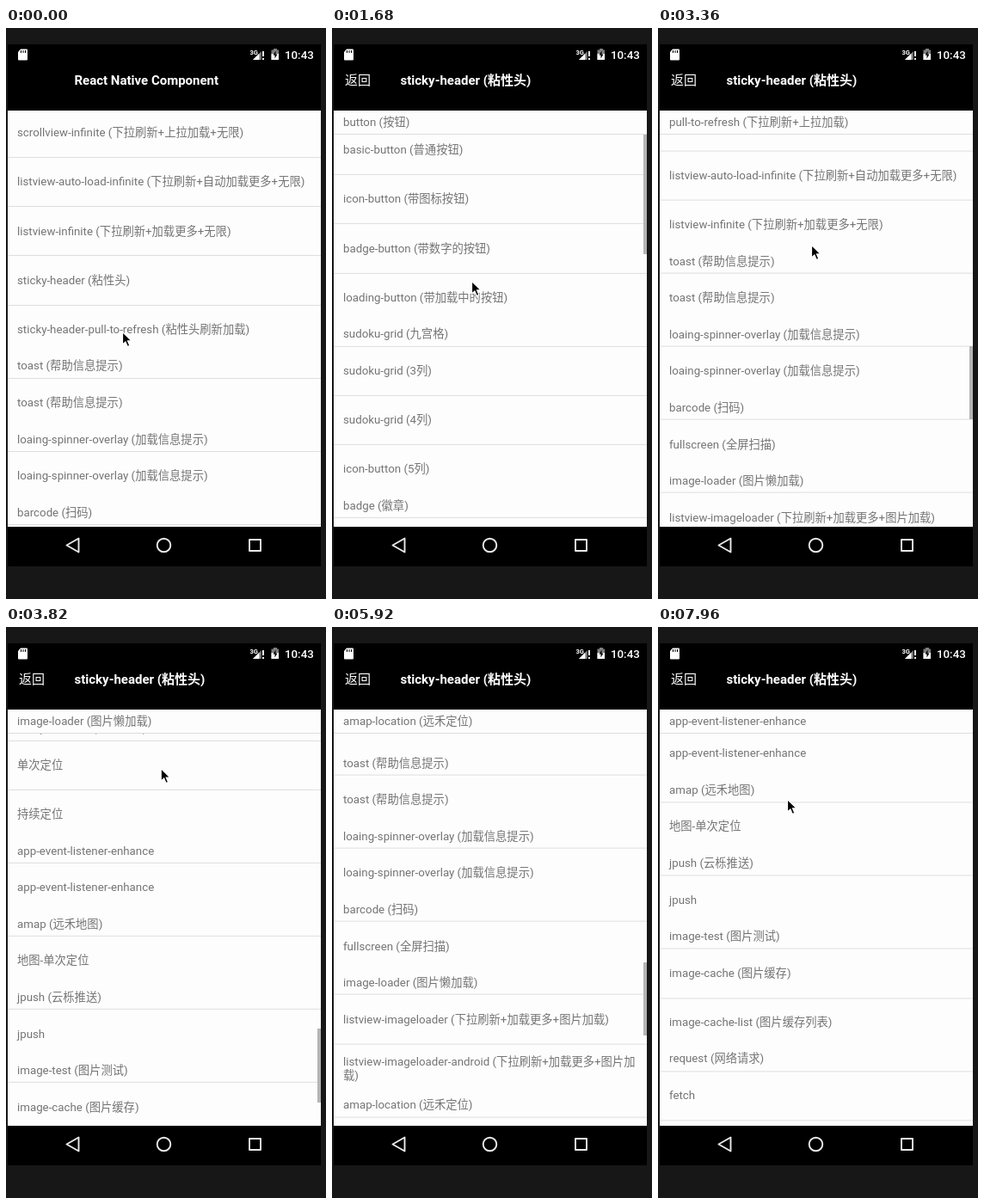
These frames come from a looping animation (372 px wide and 664 px high, 8 s). An HTML page:

```html
<!DOCTYPE html>
<html lang="zh-CN">
<head>
<meta charset="utf-8">
<title>Sticky header list</title>
<style>
html, body { margin: 0; width: 100%; height: 100%; overflow: hidden; background: #171717; }
body { position: relative; font: 13.3px/15.6px Roboto, "Noto Sans CJK SC", "Noto Sans CJK", sans-serif; color: #747474; }
.phone { position: absolute; left: 2px; top: 19px; width: 364px; height: 607px; background: #000; }
.view { position: absolute; left: 2px; top: 96px; width: 364px; height: 484px; overflow: hidden; background: #fdfdfd; }
.page { position: absolute; inset: 0; overflow: hidden; background: #fdfdfd; }
.list { position: absolute; inset: 0 0 auto 0; }
.row, .head { box-sizing: border-box; display: flex; align-items: center; padding: 0 11px; border-bottom: 1px solid #dedede; }
.row { height: 57.21px; }
.head { height: 27.91px; background: #fdfdfd; }
.row:has(+ .head) { border-color: transparent; }
#sticky { position: absolute; top: 0; left: 0; width: 100%; }
#thumb { position: absolute; right: 0; width: 4px; background: #b4b4b4; }
.bar { position: absolute; top: 51px; line-height: 20px; font-size: 15px; color: #fff; white-space: nowrap; }
.title { left: 79.5px; font-weight: 700; }
svg { position: absolute; left: 0; top: 0; }
</style>
</head>
<body>
<div class="phone"></div>
<div class="bar title" id="homeTitle">React Native Component</div>
<div class="bar title" id="demoTitle">sticky-header (粘性头)</div>
<div class="bar" id="back" style="left:15px">返回</div>
<div class="view">
  <div class="page" id="home"><div class="list" style="top:-2.2px"></div></div>
  <div class="page" id="demo">
    <div class="list"></div>
    <div id="thumb"></div>
    <div class="head" id="sticky"></div>
  </div>
</div>
<svg width="372" height="664" viewBox="0 0 372 664">
  <g fill="#fff">
    <path d="M17 24.5h7q1 0 1 1v11q0 1-1 1h-9q-1 0-1-1v-8.500z"/>
    <path d="M17.500 26v3M20 26v3M22.500 26v3" stroke="#000"/>
    <text x="283.500" y="30.500" font-size="7.500" font-weight="700">3G</text>
    <path d="M287 37L297 27V37z" opacity=".45"/>
    <path d="M287 37L294.500 29.500V37z"/>
    <path d="M298 27h2v6h-2zM298 35h2v2h-2z"/>
    <path d="M311 24h4v1.500h2V37h-8.500V25.500H311z" opacity=".5"/>
    <path d="M308.500 30h8.500v7h-8.500z"/>
    <path d="M313.500 26.500l-3 5h2v4l3-5h-2z" fill="#000"/>
    <text x="324" y="35.700" font-size="13.300" font-weight="500">10:43</text>
  </g>
  <g fill="none" stroke="#e9e9e9" stroke-width="1.900" stroke-linejoin="round" transform="translate(.5 .5)">
    <path d="M70 601L84 593V609z"/>
    <circle cx="183" cy="601" r="7.800"/>
    <path d="M282.500 594.500h13v13h-13z"/>
  </g>
  <path id="cursor" d="M0 0V14.500L3.400 11.400L5.800 17L8.400 15.900L6 10.400H10.500z" fill="#000" stroke="#fff" stroke-width="1.200"/>
</svg>
<script>
const ROW = 57.2, HEAD = 27.9, VIEW = 484, TOTAL = 2737.6, LOOP = 8000, STEP = 20;

// A leading "#" marks a section header.
const homeItems = `scrollview-infinite (下拉刷新+上拉加载+无限)
listview-auto-load-infinite (下拉刷新+自动加载更多+无限)
listview-infinite (下拉刷新+加载更多+无限)
sticky-header (粘性头)
sticky-header-pull-to-refresh (粘性头刷新加载)
#toast (帮助信息提示)
toast (帮助信息提示)
#loaing-spinner-overlay (加载信息提示)
loaing-spinner-overlay (加载信息提示)
#barcode (扫码)`.split("\n");

const demoItems = `#button (按钮)
basic-button (普通按钮)
icon-button (带图标按钮)
badge-button (带数字的按钮)
loading-button (带加载中的按钮)
#sudoku-grid (九宫格)
sudoku-grid (3列)
sudoku-grid (4列)
icon-button (5列)
#badge (徽章)
badge (徽章)
badge-text (文字徽章)
#checkbox (复选框)
checkbox (复选框)
checkbox-group (复选框组)
#gesture-password (手势密码)
gesture-password (手势密码)
gesture-password-verify (手势密码验证)
#swiper (轮播)
swiper (轮播)
swiper-auto (自动轮播)
#security-text (保密文本)
security-text (保密文本)
#refresh-infinite-control (上拉刷新,下拉加载)
refresh-infinite-scrollview (上拉刷新,下拉加载)
#timer-enhance (es6 timer mixin)
timer-enhance(es6 timer mixin)
#pull-to-refresh (下拉刷新+上拉加载)
scrollview (下拉刷新+上拉加载更多)
listview (下拉刷新+上拉加载更多)
scrollview-auto-load (下拉刷新+自动加载更多)
listview-auto-load (下拉刷新+自动加载更多)
scrollview-infinite (下拉刷新+上拉加载+无限)
listview-auto-load-infinite (下拉刷新+自动加载更多+无限)
listview-infinite (下拉刷新+加载更多+无限)
#toast (帮助信息提示)
toast (帮助信息提示)
#loaing-spinner-overlay (加载信息提示)
loaing-spinner-overlay (加载信息提示)
#barcode (扫码)
fullscreen (全屏扫描)
#image-loader (图片懒加载)
listview-imageloader (下拉刷新+加载更多+图片加载)
listview-imageloader-android (下拉刷新+加载更多+图片加载)
#amap-location (远禾定位)
单次定位
持续定位
#app-event-listener-enhance
app-event-listener-enhance
#amap (远禾地图)
地图-单次定位
#jpush (云栎推送)
jpush
#image-test (图片测试)
image-cache (图片缓存)
image-cache-list (图片缓存列表)
#request (网络请求)
fetch`.split("\n");

const $ = id => document.getElementById(id);
const clamp = x => Math.min(1, Math.max(0, x));
const progress = (t, from, to) => clamp((t - from) / (to - from));

// Builds the list and returns its section headers with their offsets.
function build(page, items) {
  const list = page.querySelector(".list"), sections = [];
  let top = 0;
  for (const item of items) {
    const isHead = item[0] === "#", div = document.createElement("div");
    div.className = isHead ? "head" : "row";
    div.textContent = item.replace("#", "");
    list.append(div);
    if (isHead) sections.push({ top, text: div.textContent });
    top += isHead ? HEAD : ROW;
  }
  return sections;
}

// Monotone cubic interpolation through keys [time, value, ...].
function curve(keys, t, k = 1) {
  const last = keys.length - 1;
  if (t <= keys[0][0]) return keys[0][k];
  if (t >= keys[last][0]) return keys[last][k];
  const i = keys.findIndex(key => key[0] > t) - 1;
  const slope = j => (keys[j + 1][k] - keys[j][k]) / (keys[j + 1][0] - keys[j][0]);
  const tangent = j => {
    if (j === 0 || j === last) return 0;
    const a = slope(j - 1), b = slope(j);
    return a * b > 0 ? 2 * a * b / (a + b) : 0;
  };
  const [a, b] = [keys[i], keys[i + 1]], span = b[0] - a[0], u = (t - a[0]) / span;
  return a[k] * (1 + 2 * u) * (1 - u) ** 2 + b[k] * u * u * (3 - 2 * u)
    + span * u * (1 - u) * (tangent(i) * (1 - u) - tangent(i + 1) * u);
}

const scrollKeys = [[1580, 0], [1680, 10.1], [1980, 160], [2400, 810], [2780, 1084.9], [3200, 1280],
  [3360, 1547.4], [3800, 2090], [4280, 2208.8], [4700, 2060], [5300, 1850], [5920, 1660.4],
  [6350, 1570], [6650, 1600], [7150, 2080], [7500, 2253.6]];
const cursorKeys = [[240, 135, 353], [460, 138, 297], [1200, 145, 298], [1550, 162, 304], [1680, 162, 294],
  [1980, 164, 145], [2250, 164, 150], [2600, 164, 284], [2780, 165, 283], [3000, 168, 200], [3250, 178, 300],
  [3360, 178, 252], [3560, 178, 130], [3850, 180, 170], [4200, 185, 286], [4280, 185, 290], [4800, 188, 470],
  [6500, 165, 400], [6900, 155, 190], [7960, 150, 200]];
const scrollAt = t => curve(scrollKeys, t);

// The sticky title lags: it holds its value during some stretches.
function stickyScroll(t) {
  if (t < 2430) return 0;
  if (t >= 4030 && t < 5960) return scrollAt(4280);
  if (t >= 6440 && t < 7330) return scrollAt(6440);
  return scrollAt(t);
}

build($("home"), homeItems);
const sections = build($("demo"), demoItems);
const demoList = $("demo").querySelector(".list");

function render(t) {
  const slide = 1 - (1 - progress(t, 690, 1220)) ** 3;
  $("home").style.transform = `translateX(${-182 * slide}px)`;
  $("demo").style.transform = `translateX(${364 * (1 - slide)}px)`;
  $("homeTitle").style.opacity = 1 - slide;
  $("demoTitle").style.opacity = $("back").style.opacity = slide;

  const scroll = scrollAt(t), held = stickyScroll(t);
  demoList.style.transform = `translateY(${-scroll}px)`;
  $("sticky").textContent = sections.findLast(s => s.top <= held).text;

  // Rows keep loading while the list is scrolled, so the thumb shrinks.
  const content = t < 2900 ? 1428 + 1172 * progress(t, 1700, 2300) : TOTAL;
  const thumb = $("thumb").style;
  thumb.top = scroll / content * VIEW + "px";
  thumb.height = VIEW * VIEW / content + "px";
  thumb.opacity = progress(t, 1570, 1620) * (1 - progress(t, 7650, 7880));

  const x = curve(cursorKeys, t) + .5, y = curve(cursorKeys, t, 2) + .5;
  $("cursor").setAttribute("transform", `translate(${x} ${y})`);
  $("cursor").style.display = t > 4950 && t < 6500 ? "none" : "";
}

const start = performance.now();
function tick() {
  const t = (performance.now() - start) % LOOP;
  render(Math.floor(t / STEP) * STEP);
  requestAnimationFrame(tick);
}
tick();
</script>
</body>
</html>
```
